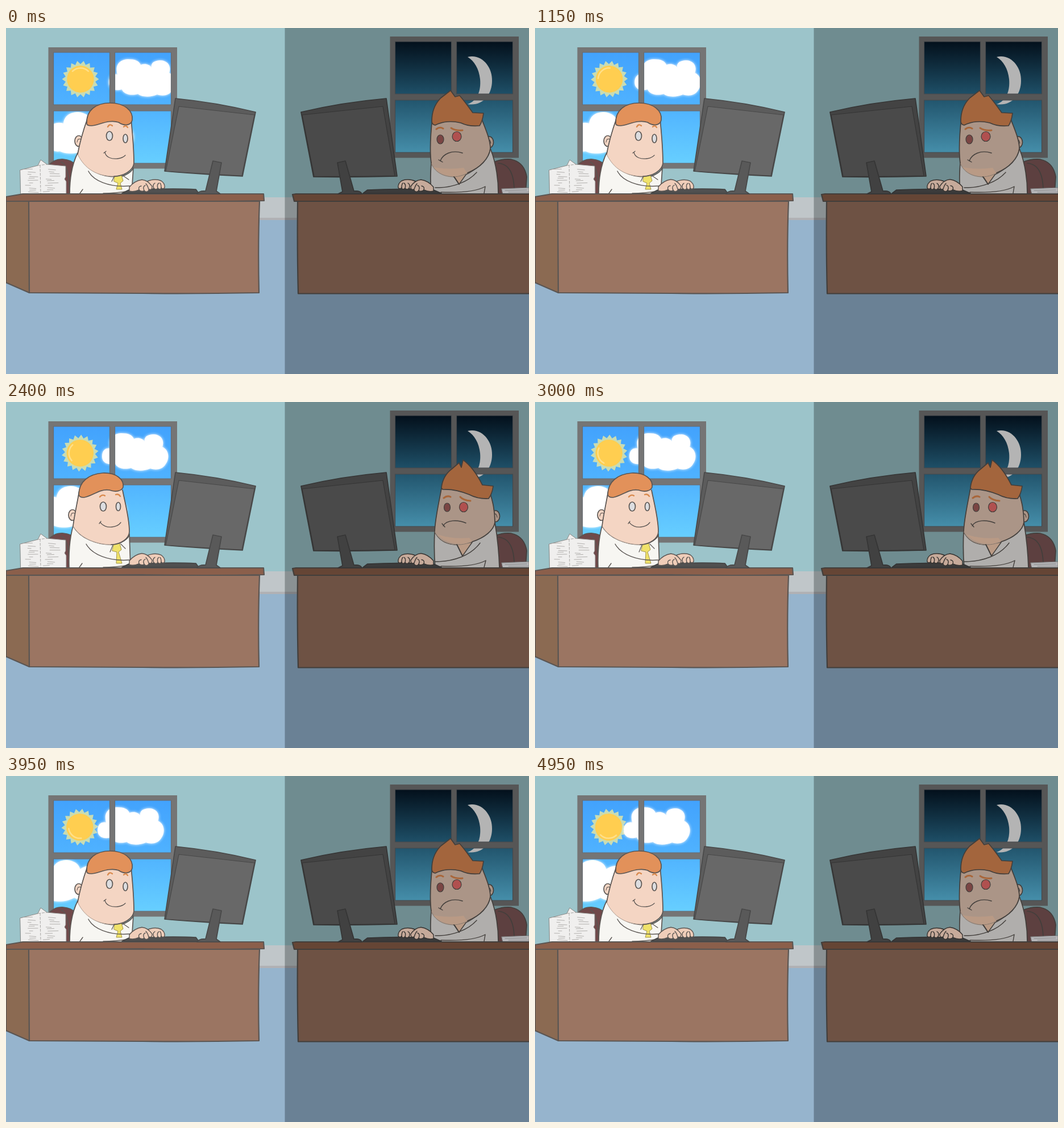
Animation, 920 px wide and 609 px high, one loop 5 s. Source, as an HTML page:

```html
<!DOCTYPE html>
<html lang="en">
<head>
<meta charset="utf-8">
<title>Day and night at the office</title>
<style>
html, body { margin: 0; width: 100%; height: 100%; overflow: hidden; }
svg { display: block; width: 100vw; height: 100vh; }
.cloud { fill: #fff; filter: drop-shadow(0 0 2.5px #fff); }
.day { stroke: #5b5653; stroke-width: 1.7; }
.night { stroke: #423e3b; stroke-width: 1.7; }
.day, .night { stroke-linejoin: round; stroke-linecap: round; }
.desk { stroke-width: 2.2; }
.line { fill: none; }
</style>
</head>
<body>
<svg viewBox="0 0 920 609" preserveAspectRatio="none">
  <defs>
    <linearGradient id="skyDay" x2="0" y2="1">
      <stop stop-color="#42a2fd"/><stop offset=".5" stop-color="#50b3ff"/><stop offset="1" stop-color="#68d0ff"/>
    </linearGradient>
    <linearGradient id="skyNight" x2="0" y2="1">
      <stop stop-color="#020d18"/><stop offset=".47" stop-color="#1e4f67"/><stop offset="1" stop-color="#4791ad"/>
    </linearGradient>
    <clipPath id="pane"><path d="M84 43H292V239H84Z"/></clipPath>
    <g id="hands" fill="#efcdb9" stroke-width="1.4">
      <path d="M217 280Q226 269 239 267Q250 268 257 279Q257 286 252 284L250 287Q246 290 243 286Q238 289 234 285Q225 289 217 287Z"/>
      <path class="line" d="M234 285Q232 279 238 278M243 286Q240 279 245 277M251 284Q249 277 246 274"/>
    </g>
    <g id="hand2" fill="#efcdb9" stroke-width="1.4">
      <path d="M248 270Q262 264 273 269Q280 274 279 281Q276 285 273 281Q272 286 267 282Q264 286 260 282Q256 285 253 280Z"/>
      <path class="line" d="M260 282Q257 276 262 273M267 282Q265 275 269 273M273 281Q273 275 271 273"/>
    </g>
  </defs>

  <!-- room -->
  <path fill="#9cc4ca" d="M0 0H491V300H0Z"/>
  <path fill="#6f8c90" d="M490.500 0H920V300H490.500Z"/>
  <path fill="#c0c6c9" d="M0 298H491V335H0Z"/>
  <path fill="#8a9193" d="M490.500 298H920V335H490.500Z"/>
  <path fill="#b1b1b4" d="M0 334H491V338H0Z"/>
  <path fill="#7f8083" d="M490.500 334H920V338H490.500Z"/>
  <path fill="#96b4cd" d="M0 338H491V609H0Z"/>
  <path fill="#6a8195" d="M490.500 338H920V609H490.500Z"/>

  <!-- windows -->
  <path fill="url(#skyDay)" d="M80 40H296V242H80Z"/>
  <g clip-path="url(#pane)">
    <g id="sun"></g>
    <g id="clouds">
      <path class="cloud" d="M181 96C181 84 188 80 196 82C190 62 204 55 215 55C228 55 234 58 237 65C244 62 253 64 256 70C254 60 263 57 273 57C286 58 291 69 287 79C299 84 300 100 293 109C287 120 274 120 266 117C252 123 238 121 232 116C220 120 206 116 204 108C190 112 181 106 181 96Z"/>
      <path class="cloud" d="M72 192C72 170 88 164 101 168C103 152 116 148 127 148C140 149 148 155 150 164C170 150 190 165 200 172C218 170 226 182 224 196C222 210 205 214 195 208C180 222 150 222 140 214C125 223 104 222 95 217C78 220 72 205 72 192Z"/>
    </g>
  </g>
  <g id="frameDay"></g>
  <path fill="url(#skyNight)" d="M680 20H897V224H680Z"/>
  <path fill="#b4b4b4" d="M812 51C838 45 856 70 855 93C855 118 838 138 812 134C828 129 836 112 834 90C832 72 824 58 812 51Z"/>
  <g id="frameNight"></g>

  <!-- chairs and paper -->
  <g class="day">
    <path fill="#70494a" d="M74 243Q84 230 101 231Q114 232 122 240V292H74Z"/>
    <path class="line" d="M97 236Q111 240 112 292"/>
    <path fill="#f0efee" stroke="#8a8886" stroke-width="1" d="M25 250L56 242L61 232L72 240L105 243V262L103 266L106 270V292H26Z"/>
  </g>
  <g id="sheets" stroke="#a19f9c" fill="none"></g>
  <g class="night">
    <path fill="#5d4040" d="M858 236Q872 230 888 231Q912 236 916 262L914 292H858Z"/>
    <path class="line" d="M866 238Q893 240 894 284"/>
    <path fill="#b5b5b8" stroke="#777" stroke-width="1" d="M872 283L920 281V292H874Z"/>
    <path class="line" stroke="#888" stroke-width="1" d="M878 286L916 285M884 289H920"/>
  </g>

  <!-- people -->
  <g id="manDay" class="day"></g>
  <g id="manNight" class="night"></g>

  <!-- desks -->
  <g class="day desk">
    <path fill="#8b6a52" d="M0 304L41 305V466L0 448Z"/>
    <path fill="#9b7562" d="M40 305H446Q443 380 445 466Q330 468 240 467L41 466Z"/>
    <path fill="#8b5f4b" d="M0 297L30 292H453L454 304Q350 306 240 304L0 305Z"/>
  </g>
  <g class="night desk">
    <path fill="#6e5244" d="M513 305H924V467.500H514Q512 390 513 305Z"/>
    <path fill="#654535" d="M504 293L510 292H924V305L507 305Z"/>
  </g>

  <!-- monitors, keyboards, hands -->
  <g class="day">
    <path fill="#505050" stroke="#444" d="M204 291L216 285Q290 282 334 284L339 291Z"/>
    <use href="#hand2" id="dayB"/>
    <use href="#hands" id="dayA"/>
    <g stroke="#484848">
      <path fill="#5c5c5c" d="M298 124Q370 131 439 148L416 261Q350 258 279 252Z"/>
      <path fill="#686868" stroke-width="1.2" d="M304 138L437 153L415 260Q350 257 281 252Z"/>
      <path fill="#595959" d="M336 292Q340 286 351 287L364 234L379 237L370 287L377 292Z"/>
    </g>
  </g>
  <g class="night">
    <path fill="#3b3b3b" stroke="#333" d="M628 291L636 285Q690 282 752 285L766 291Z"/>
    <g transform="matrix(-1 0 0 1 969 0)" style="filter:brightness(.83)">
      <use href="#hand2" id="nightB"/>
      <use href="#hands" id="nightA"/>
    </g>
    <g stroke="#353535">
      <path fill="#434343" d="M669 124Q590 131 519 148L541 262Q610 263 688 261Z"/>
      <path fill="#4a4a4a" stroke-width="1.2" d="M663 138L521 153L542 261Q610 262 684 260Z"/>
      <path fill="#414141" d="M583 237L597 234L612 287Q624 286 626 292H584L592 288Z"/>
    </g>
  </g>
</svg>

<script>
const LOOP = 5000;
const $ = id => document.getElementById(id);

function add(parent, attrs) {
  const el = document.createElementNS('http://www.w3.org/2000/svg', 'path');
  for (const k in attrs) el.setAttribute(k, attrs[k]);
  return parent.appendChild(el);
}

const oval = (x, y, rx, ry) =>
  `M${x - rx} ${y}a${rx} ${ry} 0 1 0 ${2 * rx} 0a${rx} ${ry} 0 1 0 ${-2 * rx} 0Z`;

function windowFrame(id, x, y, base, edge) {
  const box = (l, t, r, b) => `M${x + l} ${y + t}H${x + r}V${y + b}H${x + l}Z`;
  const panes = box(9, 9, 108, 101) + box(117, 9, 216, 101) +
                box(9, 112, 108, 204) + box(117, 112, 216, 204);
  add($(id), { d: box(0, 0, 226.5, 213.5) + panes, fill: base, 'fill-rule': 'evenodd' });
  add($(id), { d: panes, fill: 'none', stroke: edge, 'stroke-width': 1.2 });
}
windowFrame('frameDay', 74.5, 34, '#757575', '#666b70');
windowFrame('frameNight', 675.5, 15, '#565656', '#45494c');

// Sun around its own centre
const rays = Array.from({ length: 36 }, (_, i) => {
  const a = i * Math.PI / 18, r = i % 2 ? 26.5 : 32.5;
  return `${(r * Math.cos(a)).toFixed(1)} ${(r * Math.sin(a)).toFixed(1)}`;
});
add($('sun'), { d: `M${rays.join('L')}Z`, fill: '#c8dcb4' });
add($('sun'), { d: oval(0, 0, 23.8, 23.8), fill: '#ffce50' });
add($('sun'), { d: 'M5 -19A20 20 0 0 1 19 5', fill: 'none', stroke: '#ffe08a', 'stroke-width': 2.5, 'stroke-linecap': 'round' });

// Loose page edges
let seed = 7;
const rnd = () => (seed = seed * 16807 % 2147483647) / 2147483647;
for (let y = 248; y < 291; y += 4) {
  for (const x of [28, 64]) {
    const l = x + rnd() * 14, w = 6 + rnd() * 14;
    add($('sheets'), { d: `M${l} ${y + rnd() * 2}l${w} ${rnd() * 3 - 1}`, 'stroke-width': .8 });
  }
}
add($('sheets'), { d: 'M60 241L61 291M56 242L72 240', 'stroke-width': .9, 'stroke-dasharray': '5 2' });

// Each part: fill, leaning pose, upright pose, extra attributes
const parts = [];
function man(id, rows) {
  for (const [fill, a, b, extra] of rows)
    parts.push({ el: add($(id), { fill, ...extra }), a, b });
}
const pen = (stroke, width) => ({ stroke, 'stroke-width': width });

man('manDay', [
  ['#f7f6f2', 'M112 292C112 265 116 240 126 220C140 250 165 262 195 262C210 262 222 252 224 246L221 292Z',
    'M111 292C110 265 112 240 118 218C130 240 160 251 185 251C202 251 217 240 217 232L219 292Z'],
  ['#f0e26a', 'M191 262L203 259L206 269L201 273L204 284L194 284L197 273L190 270Z',
    'M190 250L200 249L203 260L198 264L204 284L194 284L195 264L187 262Z', pen('#a3964a', 1)],
  ['none', 'M190 262L186 270M206 260L216 267', 'M188 252L183 264M202 250L210 258', { 'stroke-width': 1.2 }],
  ['#f4d5c3', oval(128, 199, 7, 9.5), oval(117, 199, 7, 9.5)],
  ['none', 'M132 196Q126 193 125 201', 'M121 196Q115 193 114 201', { 'stroke-width': 1.1 }],
  ['#f4d5c3', 'M143 160C136 180 130 200 126 222C138 248 160 261 190 261C208 261 224 250 225 238C225 210 222 180 220 160Z',
    'M129 155C126 175 121 195 118 218C130 240 160 251 185 251C202 251 217 240 217 228C217 205 210 180 205 155Z', pen('#b5a195', 1)],
  ['none', 'M143 160C136 180 130 200 126 222M190 261C208 261 224 250 225 238C225 210 222 180 220 160',
    'M129 155C126 175 121 195 118 218M185 251C202 251 217 240 217 228C217 205 210 180 205 155'],
  ['#e2915a', 'M142 168C141 145 158 132 183 132C208 132 224 145 222 162C220 172 208 173 198 166C180 160 162 172 150 172C145 172 142 171 142 168Z',
    'M128 162C129 140 145 127 170 125C195 124 208 137 206 150C203 157 193 159 182 155C165 152 152 166 137 168C130 168 128 166 128 162Z'],
  ['#dcdde0', oval(182, 190, 5.5, 8), oval(171, 184, 5.5, 8)],
  ['#dcdde0', oval(210, 194.5, 4, 7.5), oval(197.5, 184, 4, 7.5)],
  ['none', 'M179 174Q182 168 187 172M207 174Q211 170 214 175', 'M165 167Q169 162 174 165M193 163Q198 161 201 166', pen('#d98a4e', 2.4)],
  ['none', 'M172 220L176 217M174 219C176 228 186 231 196 230Q205 229 210 224', 'M164 214L167 210M166 212C170 218 178 221 186 220Q197 219 202 212', { 'stroke-width': 1.3 }],
  ['none', 'M145 252C153 268 180 281 218 278M171 291Q192 291 217 287M130 291L135 284', 'M141 250C151 268 180 281 218 278M171 291Q192 291 217 287M129 291L134 284', { 'stroke-width': 1.4 }]
]);

man('manNight', [
  ['#b0aeac', 'M748 292C746 270 747 250 748 238C760 255 775 262 795 262C820 258 844 235 852 212C861 235 866 262 866 292Z',
    'M755 292C753 270 753 250 754 228C762 245 778 252 800 251C825 248 854 230 860 212C864 235 867 262 868 292Z'],
  ['#ab9587', oval(850, 201, 7.5, 10), oval(861, 201, 7.5, 10)],
  ['none', 'M846 197Q852 195 853 203', 'M857 197Q863 195 864 203', { 'stroke-width': 1.1 }],
  ['#b99a85', 'M788 261L797 275L812 254Z', 'M793 250L803 271L820 247Z', { 'stroke-width': 1.4 }],
  ['#ab9587', 'M750 158C747 185 745 215 748 238C754 253 768 262 788 262C818 260 848 235 852 212C852 195 842 175 836 158Z',
    'M766 152C760 185 755 205 754 228C762 245 778 252 800 251C825 248 855 232 860 212C860 190 856 175 851 158Z', pen('#85776c', 1)],
  ['#b99a85', 'M752 245Q780 250 805 246L811 255Q797 262 787 261Q764 260 752 245Z',
    'M759 233Q785 242 815 239L820 245Q806 251 798 250Q774 249 759 233Z', { stroke: 'none' }],
  ['none', 'M750 158C747 185 745 215 748 238M812 255C834 246 850 230 852 212C852 195 842 175 836 158M788 262L797 275',
    'M766 152C760 185 755 205 754 228M820 246C842 239 858 226 860 212C860 190 856 175 851 158M793 251L803 271'],
  ['#a3653d', 'M749 164C749 145 756 132 765 123L782 110L790 121L798 119C806 128 813 138 821 149L840 150Q838 165 833 172Q815 174 800 167Q775 161 755 171Q749 170 749 164Z',
    'M766 150C768 135 776 124 784 118L797 107L801 115L804 102C818 112 830 130 838 146L857 148Q855 162 849 170Q830 171 815 163Q790 153 770 154Q766 154 766 150Z'],
  ['#7a4543', oval(764, 196, 6, 8), oval(776, 185.5, 5.5, 7.5), { 'stroke-width': 1.2 }],
  ['#b0504f', oval(793, 191, 8, 8.5), oval(805, 185, 7.5, 8.5), { 'stroke-width': 1.2 }],
  ['none', 'M757 178Q763 173 769 177M783 176Q790 181 803 180', 'M770 169Q776 164 782 167M799 167Q804 173 817 174', pen('#a8663a', 3)],
  ['none', 'M764 234C768 222 784 214 803 220M761 232L768 236', 'M769 218C775 207 795 207 809 213M767 214L772 220', { 'stroke-width': 1.4 }],
  ['none', 'M828 254C814 270 786 282 755 281M841 291L843 279Q822 291 765 289', 'M834 248C818 270 788 281 755 281M841 291L844 279Q822 291 765 289', { 'stroke-width': 1.4 }]
]);

// Blends two paths that share their commands
function blend(a, b, k) {
  const to = b.match(/-?[\d.]+/g);
  let i = 0;
  return a.replace(/-?[\d.]+/g, n => +n + (to[i++] - n) * k);
}

const ramp = (t, from, len) => Math.min(1, Math.max(0, (t - from) / len));
let lastPose = -1;

function draw(now) {
  const t = Math.floor(now % LOOP / 50) * 50;
  const s = t / 1000;
  $('clouds').setAttribute('transform', `translate(${-5 * s} 0)`);
  $('sun').setAttribute('transform', `translate(${131 - .3 * s} 90) rotate(${-60 - 36 * s})`);

  const pose = ramp(t, 1400, 100) - ramp(t, 3500, 100);
  if (pose !== lastPose) {
    for (const p of parts) p.el.setAttribute('d', blend(p.a, p.b, pose));
    lastPose = pose;
  }

  const tap = Math.sin(s * Math.PI * 8);
  for (const side of ['day', 'night']) {
    $(side + 'A').setAttribute('transform', `translate(0 ${.8 * tap})`);
    $(side + 'B').setAttribute('transform', `translate(0 ${-.8 * tap})`);
  }
}

function tick() {
  draw(performance.now());
  requestAnimationFrame(tick);
}
tick();
</script>
</body>
</html>
```
